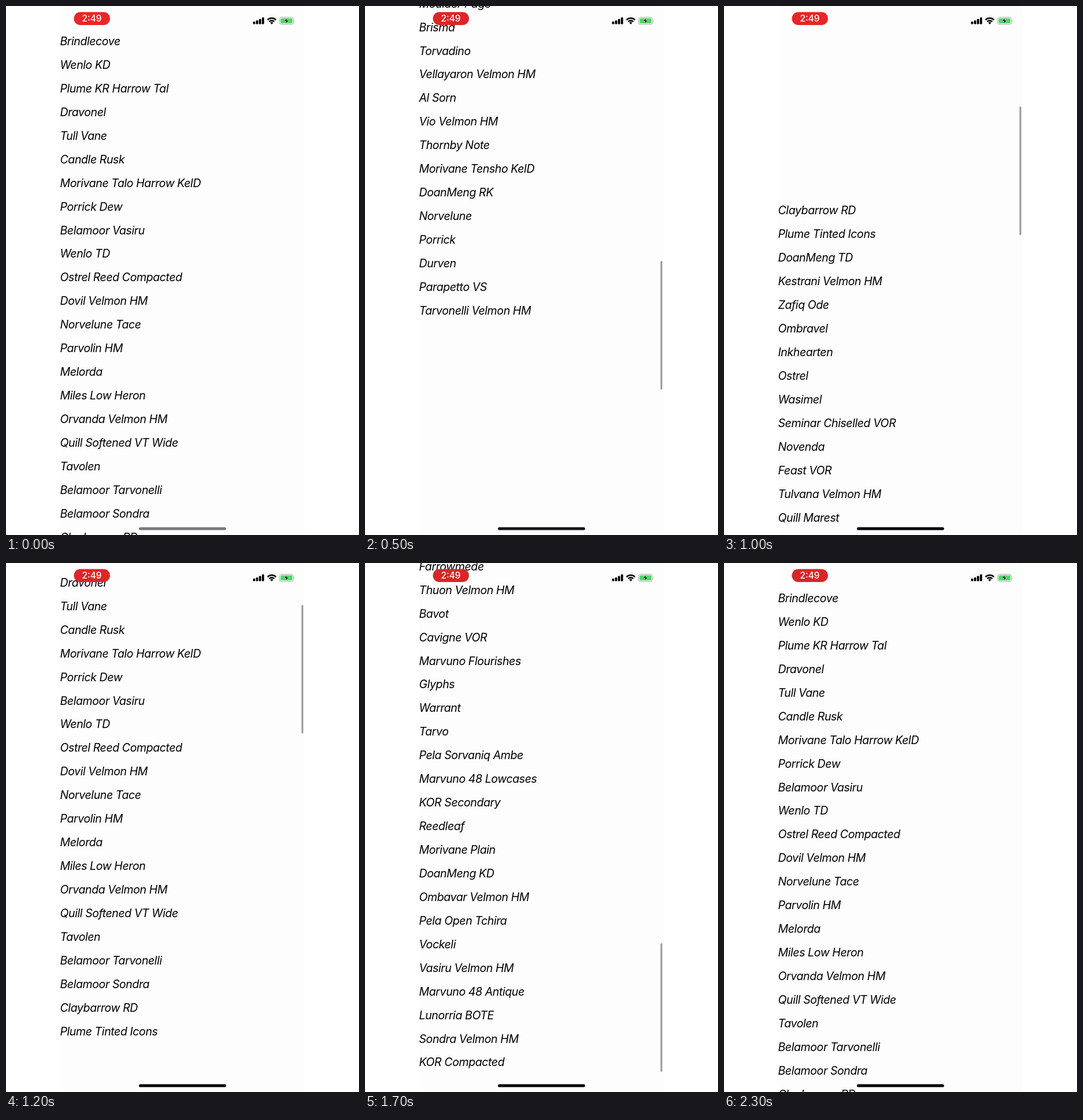
Animation, 611 px wide and 917 px high, one loop 2.4 s. Source, as an HTML page:

```html
<!DOCTYPE html>
<html lang="en">
<head>
<meta charset="utf-8">
<title>Scrolling list</title>
<style>
  html, body { margin: 0; width: 100%; height: 100%; overflow: hidden; background: #fff; }
  svg { display: block; width: 611px; height: 917px; font-family: Inter, Roboto, sans-serif; }
  #list { font-size: 19.6px; font-style: italic; letter-spacing: -.45px; }
</style>
</head>
<body>
<svg viewBox="0 0 611 917">
  <rect x="94" width="423" height="917" fill="#fdfdfd"/>
  <g id="list"></g>
  <rect id="thumb" x="511.5" width="3" rx="1.5" fill="#999"/>
  <rect id="pill" x="117.5" y="10.5" width="62.5" height="22.5" rx="11.25"/>
  <text x="148.5" y="27.3" font-size="15.5" font-weight="500" fill="#fff" text-anchor="middle">2:49</text>
  <g id="signal"></g>
  <g fill="none" stroke="#000" stroke-width="2.6">
    <path d="M452.6 24.1A10.5 10.5 0 0 1 467.4 24.1M455.6 27.2A6.2 6.2 0 0 1 464.4 27.2"/>
    <path d="M460 31.8l-2.6-2.7a3.7 3.7 0 0 1 5.2 0z" fill="#000" stroke="none"/>
  </g>
  <rect x="473.5" y="19.5" width="24" height="12.5" rx="3.6" fill="#fff" stroke="#a6a6a6"/>
  <rect x="475.2" y="21.2" width="20.6" height="9.1" rx="2" fill="#4cd964"/>
  <path d="M498.8 23.8q1.6 2 0 4z" fill="#a6a6a6"/>
  <path d="M487 20.5L481 26.6H484.8L483.4 31L489.4 24.8H485.6z" stroke="#fff" stroke-width=".5"/>
  <rect id="home" x="230" y="903.4" width="151" height="5.2" rx="2.6"/>
</svg>
<script>
const names = `Brindlecove,Wenlo KD,Plume KR Harrow Tal,Dravonel,Tull Vane,Candle Rusk,
Morivane Talo Harrow KelD,Porrick Dew,Belamoor Vasiru,Wenlo TD,Ostrel Reed Compacted,
Dovil Velmon HM,Norvelune Tace,Parvolin HM,Melorda,Miles Low Heron,Orvanda Velmon HM,
Quill Softened VT Wide,Tavolen,Belamoor Tarvonelli,Belamoor Sondra,Claybarrow RD,
Plume Tinted Icons,DoanMeng TD,Kestrani Velmon HM,Zafiq Ode,Ombravel,Inkhearten,Ostrel,
Wasimel,Seminar Chiselled VOR,Novenda,Feast VOR,Tulvana Velmon HM,Quill Marest,Nadeh,Quill,
Slatebroom,Tebo,Moulder Page,Brisma,Torvadino,Vellayaron Velmon HM,Al Sorn,Vio Velmon HM,
Thornby Note,Morivane Tensho KelD,DoanMeng RK,Norvelune,Porrick,Durven,Parapetto VS,
Tarvonelli Velmon HM,Stonemoor,Elura Velmon HM,Pirn Loopscript,Vock Fleurons,Marvuno 48,
Celandra,Northern Keyhammers,Ostrel Reed,Farrowmede,Thuon Velmon HM,Bavot,Cavigne VOR,
Marvuno Flourishes,Glyphs,Warrant,Tarvo,Pela Sorvaniq Ambe,Marvuno 48 Lowcases,
KOR Secondary,Reedleaf,Morivane Plain,DoanMeng KD,Ombavar Velmon HM,Pela Open Tchira,
Vockeli,Vasiru Velmon HM,Marvuno 48 Antique,Lunorria BOTE,Sondra Velmon HM,KOR Compacted`.split(/,\s*/);

const LOOP = 2400, STEP = 100, LAG = 55;
const VIEW = 917, TOP = 41, PITCH = 40.94, END = 2552.6;

// Each key is [time, value]
const scroll = [[0, 0], [100, 15], [200, 110], [300, 420], [400, 960], [500, 1662], [600, 2250],
  [700, 2545], [800, 1953], [900, 1212], [1000, 566.4], [1050, 60], [1100, -52], [1200, 150],
  [1300, 900], [1400, 1950], [1450, 2325], [1500, 2469.9], [1600, 2545], [1700, END],
  [1800, 1500], [1900, 200], [1950, -30], [2000, -52.6], [2100, -22], [2200, -5], [2300, 0]];
const pulse = [[0, 232], [250, 250], [500, 219], [750, 250], [1000, 230], [1250, 217],
  [1500, 253], [1700, 217], [2000, 252], [2300, 215]];
const homeGrey = [[0, 120], [100, 70], [500, 20], [700, 0]];
const thumbFade = [[0, 0], [100, 1], [2100, 1], [2300, 0]];

function at(keys, t) {
  const i = keys.findIndex(k => k[0] > t);
  if (i < 0) return keys[keys.length - 1][1];
  if (i === 0) return keys[0][1];
  const [t0, a] = keys[i - 1], [t1, b] = keys[i];
  return a + (b - a) * (t - t0) / (t1 - t0);
}

const $ = id => document.getElementById(id);
function add(parent, tag, attrs) {
  const el = document.createElementNS(parent.namespaceURI, tag);
  for (const key in attrs) el.setAttribute(key, attrs[key]);
  return parent.appendChild(el);
}

[4.5, 6.5, 9, 11.8].forEach((h, i) =>
  add($('signal'), 'rect', { x: 427.6 + i * 5.1, y: 31.5 - h, width: 3.8, height: h, rx: 1 }));

const rows = names.map(name => {
  const row = add($('list'), 'text', { x: 93.5 });
  row.textContent = name;
  return row;
});

function draw(t) {
  const off = at(scroll, t);
  const loaded = at(scroll, Math.max(0, t - LAG));
  // Rows appear late: only those in view a moment ago are drawn
  rows.forEach((row, i) => {
    const y = TOP + i * PITCH;
    const shown = y < loaded + VIEW && y + PITCH > loaded;
    row.setAttribute('y', y + 27 - off);
    row.setAttribute('visibility', shown ? 'visible' : 'hidden');
  });
  $('thumb').setAttribute('y', 36 + Math.max(0, off) * 623 / END);
  $('thumb').setAttribute('height', 223 + Math.min(0, off));
  $('thumb').setAttribute('opacity', at(thumbFade, t));
  $('pill').setAttribute('fill', `rgb(${at(pulse, t)},38,40)`);
  const grey = at(homeGrey, t);
  $('home').setAttribute('fill', `rgb(${grey},${grey},${grey})`);
}

const start = performance.now();
function tick() {
  const t = (performance.now() - start) % LOOP;
  draw(Math.floor(t / STEP) * STEP);
  requestAnimationFrame(tick);
}
tick();
</script>
</body>
</html>
```
